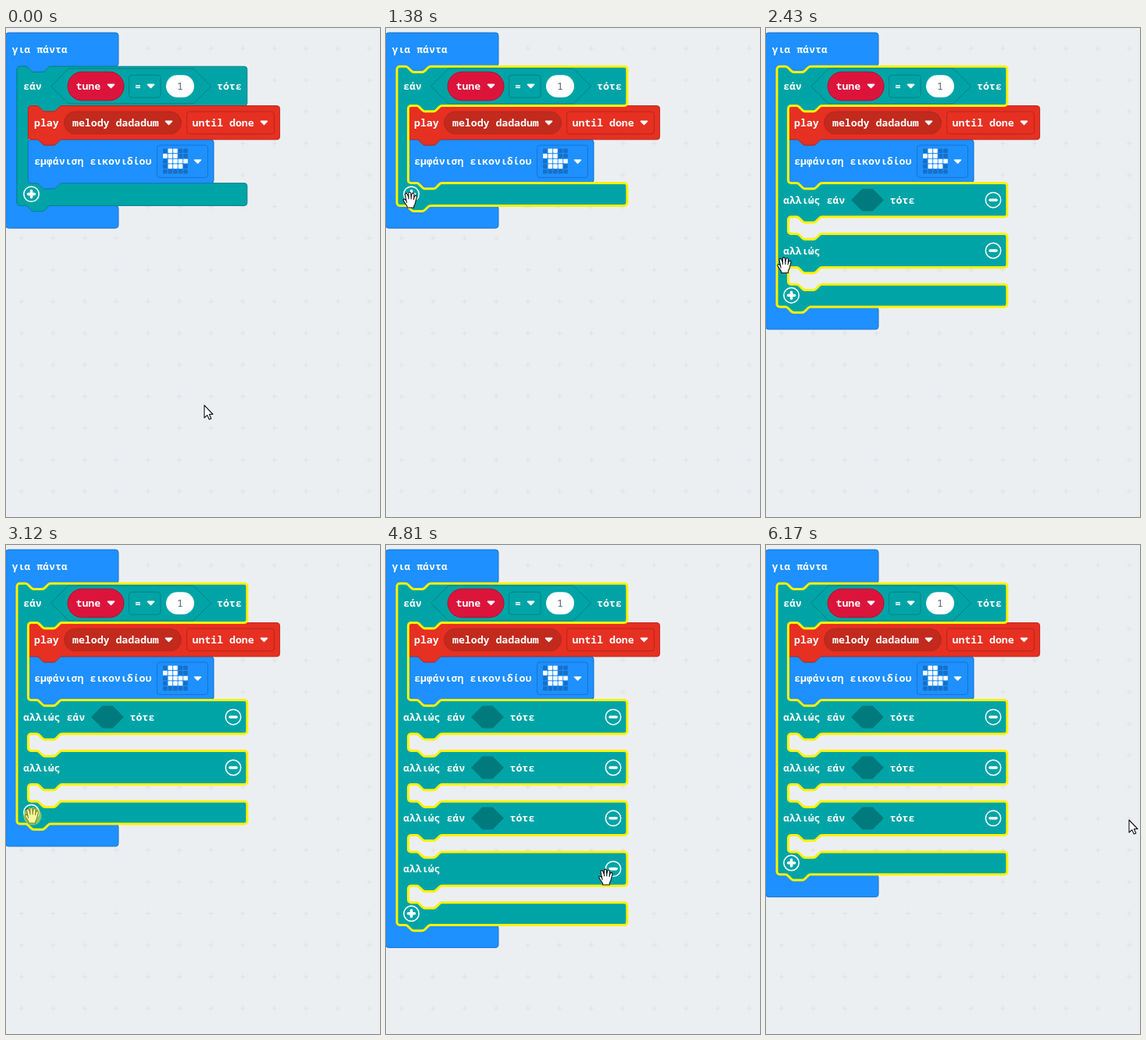
An HTML page that plays this animation: 479x626 px, repeating every 6.24 s.

```html
<!DOCTYPE html>
<html lang="el">
<head>
<meta charset="utf-8">
<title>Block editor</title>
<style>
  html, body { margin: 0; width: 100%; height: 100%; overflow: hidden; background: #eceff2; }
  svg { display: block; width: 479px; height: 626px; }
  text { font: 700 13.2px "Noto Sans Mono", "DejaVu Sans Mono", monospace; fill: #fff; white-space: pre; }
  path { vector-effect: non-scaling-stroke; }
  .basic { fill: #1e90ff; stroke: #1873cc; }
  .logic { fill: #00a4a6; stroke: #008385; }
  .music { fill: #e63022; stroke: #b8261b; }
  .tune { fill: #dc143c; stroke: #b01030; }
  .melody { fill: #c22a1d; stroke: #b8261b; }
  .empty { fill: #007a7c; }
  .ring { fill: none; stroke: #fff; stroke-width: 1.5; }
  .sign { stroke: #fff; stroke-width: 3.6; stroke-linecap: round; }
  .glow { fill: none; stroke: #fff200; stroke-width: 3; }
  .number { font-weight: 400; fill: #575e75; }
  .mouse path { fill: #fff; stroke: #111; stroke-width: 1.1; stroke-linejoin: round; }
</style>
</head>
<body>
<svg viewBox="0 0 479 626">
  <defs>
    <pattern id="grid" x="-.7" y="5.7" width="40.5" height="40.5" patternUnits="userSpaceOnUse">
      <path d="M17 20.5h7M20.5 17v7" stroke="#dde1e5"/>
    </pattern>
  </defs>
  <rect width="479" height="626" fill="url(#grid)"/>
  <g transform="translate(-.4 6) scale(.9)">
    <path id="forever" class="basic"/>
    <path id="branch" class="logic"/>
    <path id="icon" class="basic"/>
    <path id="play" class="music"/>
  </g>
  <g id="content"></g>
  <g id="sections"></g>
  <g transform="translate(-.4 6) scale(.9)"><path id="glow" class="glow"/></g>
  <g id="mouse" class="mouse">
    <path id="arrow" d="M0 0V16L3.8 12.6 6.2 18 8.8 17 6.4 11.5H11Z"/>
    <g id="pointer">
      <path d="M-2 2a2 2 0 0 1 4 0V8.5q3-.9 3.8 1 2.6-.8 3.4 1.2 2.6-.5 2.6 2V17q0 3-1.8 5v2H-1v-2q-2-2-4.2-6-1.2-2.6.6-3.2 1.4-.2 2.6 2Z"/>
      <path d="M2 8.5v4M5.8 9.5v3.5M9.2 10.7v2.8"/>
    </g>
    <g id="hand">
      <path d="M-4.5 3.5L-5 1-6.5-.5q-1.8-1-2.2.4-.2 1 .8 2.3Q-5.5 6-4 8v2H4.8V7.8Q6.6 5 7 2L8.4-3.4q.2-1.8-1-2.2-1.2-.2-1.8 1.2L4.8-2.2 5-7.2q0-1.6-1.3-1.7T2.1-7.3L1.2-3.4.8-8.4Q.6-9.9-.8-9.8T-2.1-8.2V-3.4L-3.8-7.4q-.8-1.3-2-.8t-.7 1.9Z"/>
      <path d="M-2.1-3.4v2.6M1.2-3.4v2.6M4.8-2.2l-.4 2"/>
    </g>
  </g>
  <circle id="ripple" fill="#f4f03c" opacity=".5"/>
</svg>
<script>
const LOOP = 6240;
const el = id => document.getElementById(id);

const NOTCH = 'c2 0 3 1 4 2l4 4c1 1 2 2 4 2h12c2 0 3-1 4-2l4-4c1-1 2-2 4-2';
const TAB = 'c-2 0-3 1-4 2l-4 4c-1 1-2 2-4 2h-12c-2 0-3-1-4-2l-4-4c-1-1-2-2-4-2';

// rows alternates bar heights and mouth heights, beginning and ending with a bar
function blockPath(x, y, width, rows, joined = true) {
  const right = x + width - 4;
  let d = `M${x} ${y + 4}a4 4 0 0 1 4-4${joined ? 'h8' + NOTCH : ''}H${right}a4 4 0 0 1 4 4`;
  rows.forEach((height, i) => {
    y += height;
    if (i % 2) {
      d += `V${y - 4}a4 4 0 0 0 4 4h8${NOTCH}H${right}a4 4 0 0 1 4 4`;
    } else {
      d += `V${y - 4}a4 4 0 0 1-4 4`;
      if (i < rows.length - 1) d += `H${x + 64}${TAB}H${x + 20}a4 4 0 0 0-4 4`;
    }
  });
  return d + (joined ? `H${x + 48}${TAB}` : '') + `H${x + 4}a4 4 0 0 1-4-4z`;
}

const label = (x, y, text, cls = '') => `<text x="${x}" y="${y + 4.6}" class="${cls}">${text}</text>`;
const box = (x, y, w, h, r, cls) => `<rect x="${x}" y="${y}" width="${w}" height="${h}" rx="${r}" class="${cls}"/>`;
const caret = (x, y) =>
  `<path d="M${x - 4} ${y - 2}h8l-4 4z" fill="#fff" stroke="#fff" stroke-width="1.6" stroke-linejoin="round"/>`;
const hexagon = (x, y, w, r, cls) =>
  `<path class="${cls}" d="M${x} ${y}l${r} ${-r}h${w - 2 * r}l${r} ${r} ${-r} ${r}h${2 * r - w}z"/>`;
const button = (x, y, plus) =>
  `<circle class="ring" cx="${x}" cy="${y}" r="9.7"/><path class="sign" d="M${x - 4} ${y}h8${plus ? `M${x} ${y - 4}v8` : ''}"/>`;

function ledIcon(x, y) {
  return ['.##..', '###..', '.####', '.###.', '.....'].map((row, j) => [...row].map((led, i) =>
    `<rect x="${x + i * 6.55}" y="${y + j * 6.6}" width="5.6" height="5.6" rx=".8" fill="${led === '#' ? '#fff' : '#1670c8'}"/>`
  ).join('')).join('');
}

el('icon').setAttribute('d', blockPath(32, 152, 264, [62]));
el('play').setAttribute('d', blockPath(32, 104, 358, [48]));
el('content').innerHTML =
  label(7.5, 27.5, 'για πάντα') +
  label(22, 74.4, 'εάν') + hexagon(57.5, 74.4, 205, 22.5, 'logic') +
  box(79, 56.2, 72, 36.6, 18.3, 'tune') + label(89.5, 74.4, 'tune') + caret(134.5, 74.4) +
  box(157.5, 60.2, 40.5, 28.8, 3.6, 'logic') + label(165, 74.4, '=') + caret(185.5, 74.4) +
  box(205, 60.2, 36, 28.6, 14.3, '') .replace('class=""', 'fill="#fff"') + label(219, 74.4, '1', 'number') +
  label(270, 74.4, 'τότε') +
  label(36, 121.2, 'play') + box(74.5, 107, 150, 28.6, 14.3, 'melody') +
  label(85, 121.2, 'melody dadadum') + caret(208.5, 121.4) +
  box(231.5, 107, 112, 28.6, 3.6, 'music') + label(238.5, 121.2, 'until done') + caret(330.5, 121.4) +
  label(36, 170.6, 'εμφάνιση εικονιδίου') + box(193.5, 150, 65, 41.5, 3.6, 'basic') +
  ledIcon(201, 154.5) + caret(245.5, 171);

// start time, number of else-if sections, number of else sections
const steps = [
  [0, 0, 0], [1520, 0, 1], [2230, 1, 1], [3190, 2, 1], [3970, 3, 1], [5230, 3, 0]
];
const SELECT_AT = 1310;
// click time and place
const clicks = [[1400, 32, 214], [2090, 33, 279], [3050, 34, 347], [3830, 32.5, 407], [5090, 288, 418]];
const CLICK_LENGTH = 140;
// time, hot spot, cursor from then on
const route = [
  [0, 254, 483, 'arrow'], [50, 254, 483, 'arrow'], [565, 57, 255, 'hand'], [630, 32, 226, 'hand'],
  [700, 31, 224, 'hand'], [770, 31, 222, 'pointer'], [1300, 31, 222, 'pointer'], [1310, 31, 220, 'hand'],
  [1520, 31, 220, 'pointer'], [1880, 34, 279, 'pointer'], [2020, 34, 281, 'pointer'],
  [2230, 33, 281, 'hand'], [2570, 17, 319, 'hand'], [2850, 34, 347, 'pointer'],
  [3050, 33, 346, 'hand'], [3190, 33, 346, 'hand'], [3550, 33, 405, 'pointer'],
  [3680, 33, 407, 'pointer'], [3970, 33, 407, 'hand'], [4390, 251, 464, 'hand'],
  [4810, 281.5, 425, 'hand'], [4950, 286, 421, 'pointer'], [5230, 286, 421, 'arrow'],
  [5700, 464, 404, 'arrow'], [5770, 464, 404, ''], [6170, 465, 352, 'arrow']
];

const latest = (list, t) => list.findLastIndex(item => item[0] <= t);

let shownStep = -1;
function drawSections(index) {
  if (index === shownStep) return;
  shownStep = index;
  const [, elseIfs, elses] = steps[index];
  const count = elseIfs + elses;
  const rows = [56, 110];
  let html = '';
  for (let i = 0; i < count; i++) {
    const y = 220.2 + 64.8 * i;
    rows.push(48, 24);
    html += i < elseIfs
      ? label(22, y, 'αλλιώς εάν') + hexagon(109, y, 42, 14.4, 'empty') + label(158.5, y, 'τότε')
      : label(22, y, 'αλλιώς');
    html += button(291, y, false);
  }
  rows.push(32);
  el('sections').innerHTML = html + button(32.5, 212.6 + 64.8 * count, true);
  const branch = blockPath(16, 48, 327.6, rows);
  el('branch').setAttribute('d', branch);
  el('glow').setAttribute('d', branch);
  el('forever').setAttribute('d', blockPath(0, 0, 160.4, [48, 198 + 72 * count, 32], false));
}

function drawMouse(t) {
  const i = latest(route, t);
  const [start, x, y, kind] = route[i];
  const [end, nextX, nextY] = route[i + 1] || [LOOP, x, y];
  const k = (t - start) / (end - start);
  el('mouse').setAttribute('transform', `translate(${x + (nextX - x) * k} ${y + (nextY - y) * k})`);
  for (const name of ['arrow', 'pointer', 'hand']) el(name).style.display = name === kind ? '' : 'none';
}

function drawRipple(t) {
  const click = clicks[latest(clicks, t)];
  const active = click && t < click[0] + CLICK_LENGTH;
  const ripple = el('ripple');
  ripple.setAttribute('r', active ? 11 + (t - click[0]) / CLICK_LENGTH : 0);
  if (active) {
    ripple.setAttribute('cx', click[1]);
    ripple.setAttribute('cy', click[2]);
  }
}

function frame() {
  const t = performance.now() % LOOP;
  drawSections(latest(steps, t));
  el('glow').style.display = t >= SELECT_AT ? '' : 'none';
  drawMouse(t);
  drawRipple(t);
  requestAnimationFrame(frame);
}
frame();
</script>
</body>
</html>
```
